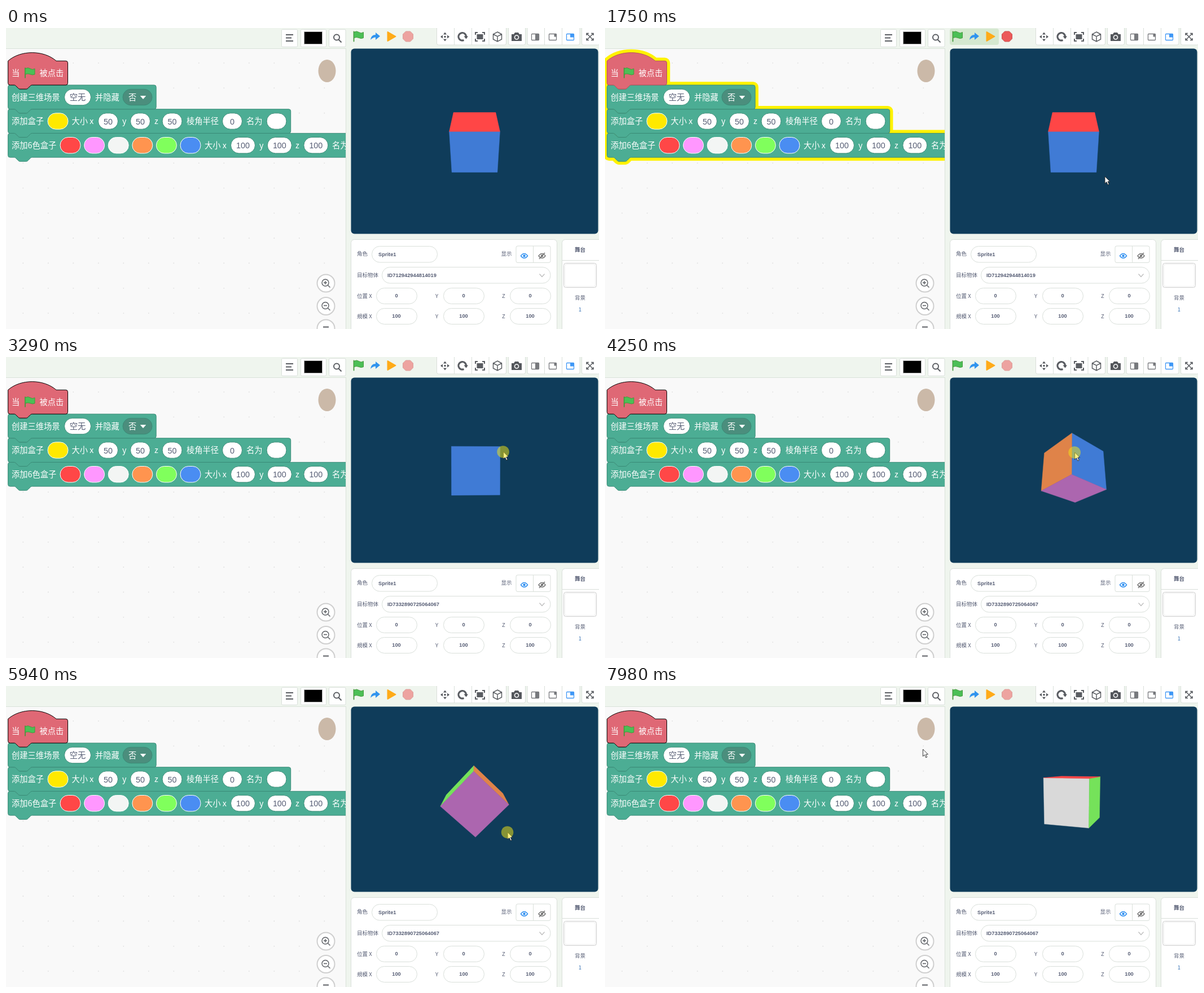
An HTML page that plays this animation: 1051x533 px, repeating every 8000 ms.

```html
<!DOCTYPE html>
<html lang="zh">
<head>
<meta charset="utf-8">
<title>三维盒子</title>
<style>
  html, body { margin: 0; width: 100%; height: 100%; overflow: hidden; background: #eff5ee; }
  svg { display: block; }
  text { font: 14.25px "Liberation Sans", "Noto Sans CJK SC", sans-serif; fill: #575e75; }
  .label { font-family: "Noto Sans CJK SC", sans-serif; fill: #fff; }
  .small { font: 9.5px "Noto Sans CJK SC", sans-serif; }
  .value { font: bold 9.3px "Liberation Sans", sans-serif; }
  .mid { text-anchor: middle; }
  .strong { font-weight: bold; }
  .box { fill: #fff; stroke: #d9dfda; }
  .icon { fill: none; stroke: #5a5d62; stroke-width: 2; }
</style>
</head>
<body>
<svg id="stage" width="1051" height="533" viewBox="0 0 1051 533"></svg>
<script>
const LOOP = 8000;
const TEAL = '#4cad94', TEAL_EDGE = '#3a8b76';

// ---------- helpers for static drawing ----------
const rect = (x, y, w, h, r = 0, attrs = 'class="box"') =>
  `<rect x="${x}" y="${y}" width="${w}" height="${h}" rx="${r}" ${attrs}/>`;
const path = (d, attrs = 'class="icon"') => `<path d="${d}" ${attrs}/>`;
const text = (x, y, str, cls) => `<text x="${x}" y="${y}" class="${cls}">${str}</text>`;
const label = (x, cy, str) => text(x, cy + 5, str, 'label');
const small = (x, y, str) => text(x, y, str, 'small');
const pill = (cx, cy, w, str = '', fill = '#fff', edge = TEAL_EDGE) =>
  rect(cx - w / 2, cy - 14.2, w, 28.4, 14.2, `fill="${fill}" stroke="${edge}"`) +
  text(cx, cy + 5.5, str, 'mid');
const swatch = (cx, cy, color) => pill(cx, cy, 36, '', color, '#fff');
const field = (x, y, w, str) =>
  rect(x + .5, y + .5, w, 28, 14) + text(x + w / 2, y + 17, str, 'value mid');
const flag = (x, y) =>
  `<g transform="translate(${x} ${y})">` +
  path('M1 1V18', 'stroke="#45993d" stroke-width="1.8" stroke-linecap="round"') +
  path('M1 2Q6-1 10 2T18 2V12Q14 14 10 12T1 12Z', 'fill="#4cbf56" stroke="#45993d"') + '</g>';

// ---------- code blocks ----------
const SCALE = .89;
const NOTCH = 'c2 0 3 1 4 2l4 4c1 1 2 2 4 2h12c2 0 3-1 4-2l4-4c1-1 2-2 4-2';
const NOTCH_BACK = 'c-2 0-3 1-4 2l-4 4c-1 1-2 2-4 2h-12c-2 0-3-1-4-2l-4-4c-1-1-2-2-4-2';
const blockPath = (top, w) =>
  `${top}H${w - 4}a4 4 0 0 1 4 4v40a4 4 0 0 1-4 4H48${NOTCH_BACK}H4a4 4 0 0 1-4-4z`;
const blocks = [
  ['hat', 58.3, 119, 'M0 0c25-22 71-22 96 0', '#df6875', '#000'],
  ['', 101, 295], ['', 143.7, 563], ['', 186.4, 760]
].map(([id, y, w, top = `M0 4A4 4 0 0 1 4 0H12${NOTCH}`, fill = TEAL, edge = TEAL_EDGE]) => ({
  id, fill, edge, d: blockPath(top, w), place: `transform="translate(3.6 ${y}) scale(${SCALE})"`
}));
const drawBlocks = () => [...blocks].reverse().map(b =>
  path(b.d, `${b.id && `id="${b.id}"`} ${b.place} fill="${b.fill}" stroke="${b.edge}" stroke-width="1.1"`)).join('');
const drawGlow = () => blocks.map(b =>
  path(b.d, `${b.place} fill="none" stroke="#fff200" stroke-width="13" stroke-linejoin="round"`)).join('');

const blockContents = () => {
  const [a, b, c, d] = [79.5, 122.5, 165, 207.7];
  const colors = ['#ff4747', '#ff97ff', '#f3f5f4', '#ff944f', '#80ff5c', '#4a8df2'];
  return label(10, a, '当') + flag(33, 70) + label(59.5, a, '被点击') +
    label(10, b, '创建三维场景') + pill(127, b, 47, '空无') + label(158, b, '并隐藏') +
    pill(233, b, 52, '', '#4b8e7d') + label(217, b, '否') +
    path('M238.5 120.5h9l-4.5 5z', 'fill="#fff" stroke="#fff" stroke-linejoin="round"') +
    label(10, c, '添加盒子') + swatch(92, c, '#ffe900') + label(116.5, c, '大小 x') +
    pill(181, c, 35, '50') + label(206, c, 'y') + pill(238, c, 35, '50') + label(263, c, 'z') +
    pill(294.5, c, 35, '50') + label(320, c, '棱角半径') + pill(401, c, 35, '0') +
    label(426, c, '名为') + pill(479.5, c, 35) +
    label(10, d, '添加6色盒子') + colors.map((k, i) => swatch(114 + i * 42.6, d, k)).join('') +
    label(352, d, '大小 x') + pill(420, d, 43, '100') + label(449, d, 'y') +
    pill(484.8, d, 43, '100') + label(513, d, 'z') + pill(549.3, d, 43, '100') + label(578, d, '名为');
};

// ---------- interface ----------
const zoomButton = (cy, sign) =>
  `<circle cx="567" cy="${cy}" r="15.5" fill="#fff" stroke="#cfcfcf" stroke-width="2"/>` +
  (sign ? `<circle cx="566" cy="${cy - 1}" r="6" class="icon" style="stroke-width:1.4"/>` +
    path(`M570.5 ${cy + 3.5}l4 4${sign}`, 'class="icon" style="stroke-width:1.4"')
    : path('M562 529.5h10', 'class="icon"'));

const workspace = () => {
  let dots = '';
  for (let x = 29.5; x < 602; x += 44.5)
    for (let y = 62; y < 533; y += 44.3) dots += `M${x} ${y}h1.6`;
  return rect(-5, 36.5, 607.5, 520, 0, 'fill="#f9f9f9" stroke="#d9e2d9"') +
    path(dots, 'stroke="#dedede" stroke-width="1.6"') +
    '<ellipse cx="569" cy="76" rx="15.5" ry="20" fill="#cbb9a8"/>' +
    `<g clip-path="url(#left)"><g id="glow">${drawGlow()}</g>${drawBlocks()}${blockContents()}</g>` +
    zoomButton(452, 'M563 451h6M566 448v6') + zoomButton(492.5, 'M563 491.5h6') + zoomButton(532);
};

const leftToolbar = () =>
  rect(488.5, 2.5, 28, 31, 2) + rect(522.5, 2.5, 45, 31, 2) + rect(572.5, 2.5, 29.5, 31, 2) +
  path('M496 12h13M496 17.5h10M496 23h13', 'class="icon" style="stroke-width:1.8"') +
  rect(528.5, 6.5, 32, 22, 0, 'fill="#000" stroke="#bbb"') +
  '<circle cx="586" cy="16.5" r="5" class="icon"/>' + path('M589.5 20.5l5 5');

const controls = () =>
  `<g id="active">${rect(611, 1, 87, 29, 4, 'fill="#d5e8d0"')}</g>` +
  `<g id="hover">${rect(611, 1, 29, 29, 4, 'fill="#d5e8d0"')}</g>` + flag(615.5, 5.5) +
  path('M646 21q1-9 9-9V8l8 6.5-8 6.5v-4.5q-5 0-9 4.5z', 'fill="#3094ee"') +
  path('M676.5 7v16l14-8z', 'fill="#ffab19" stroke="#ffab19" stroke-width="2" stroke-linejoin="round"') +
  path('M708.5 6h8l5 5v8l-5 5h-8l-5-5v-8z', 'id="stop" fill="#ec5959" stroke="#c9504f"');

const panelIcon = (x, w, h, color) =>
  rect(x - 6.5, 10.5, 13, 11, 1, `fill="none" stroke="${color}" stroke-width="1.3"`) +
  rect(x + 6.5 - w, 10.5, w, h, 0, `fill="${color}"`);

const rightToolbar = () =>
  [[763, 123], [890, 30], [923.5, 93], [1020, 32]].map(([x, w]) => rect(x + .5, -4.5, w, 34.5, 3)).join('') +
  path('M794.5 0v30M825.5 0v30M856 0v30M954.5 0v30M985.5 0v30', 'stroke="#d9dfda"') +
  path('M778 7.5l3 4h-6zM778 23.5l3-4h-6zM770 15.5l4-3v6zM786 15.5l-4-3v6zM776.5 14h3v3h-3z', 'fill="#54575c"') +
  path('M811.5 21.500a6.800 6.800 0 1 1 4-6', 'class="icon" style="stroke-width:3.2"') +
  path('M811.5 14.500h7.500l-3.500 5z', 'fill="#54575c"') +
  path('M832 12V8h4M844 8h4v4M848 19v4h-4M836 23h-4v-4') + rect(834.5, 11, 11, 9, 0, 'fill="#5a5d62"') +
  path('M871 7l7.5 4v9l-7.5 4-7.5-4v-9zM863.5 11l7.5 4 7.5-4M871 15v9', 'class="icon" style="stroke-width:1.5"') +
  path('M896 11h4l2-3h6l2 3h4v12h-18z', 'fill="#54575c"') +
  '<circle cx="905" cy="16.5" r="3.5" fill="none" stroke="#fff" stroke-width="1.6"/>' +
  panelIcon(938, 6.5, 11, '#77797d') + panelIcon(969, 4, 5, '#77797d') + panelIcon(1000, 6.5, 6, '#3f97f6') +
  path('M1029 13V9.5h4M1037 9.5h4V13M1041 18v3.5h-4M1033 21.5h-4V18M1029.5 10l11 11M1040.5 10l-11 11', 'class="icon" style="stroke-width:1.5"');

const eye = (x, color) =>
  path(`M${x - 6} 403.5q6-8 12 0q-6 8-12 0z`, `fill="none" stroke="${color}" stroke-width="1.5"`) +
  `<circle cx="${x}" cy="403.5" r="2.2" fill="${color}"/>`;

const panels = () =>
  rect(611.5, 374.5, 365, 180, 6) + rect(985.5, 374.5, 80, 180, 6) +
  small(622, 403, '角色') + rect(648.5, 386.5, 116, 28.5, 14) + text(660, 403.5, 'Sprite1', 'value') +
  small(877.5, 403, '显示') + rect(904, 386, 61, 29.5, 3) + path('M934.5 386v29', 'stroke="#d9dfda"') +
  eye(918.5, '#2f8ff0') + eye(950, '#777') + path('M945 409l10-11', 'stroke="#777" stroke-width="1.5"') +
  small(622, 440.5, '目标物体') + rect(666.5, 423.5, 298.5, 28.5, 14) +
  '<text x="676" y="441" class="value" id="objectId"></text>' +
  path('M945.5 435.5l4.5 5 4.5-5', 'fill="none" stroke="#bbb" stroke-width="1.2"') +
  [['位置 X', 0, 460], ['規模 X', 100, 496]].map(([name, value, y]) =>
    small(622, y + 17.5, name) + small(761, y + 17.5, 'Y') + small(879, y + 17.5, 'Z') +
    [656, 775, 893].map(x => field(x, y, 72, value)).join('')).join('') +
  text(1017.5, 395.5, '舞台', 'small mid strong') + path('M985 411.5h66', 'stroke="#d9dfda"') +
  rect(988.5, 416.5, 58, 43, 4, 'fill="#fff" stroke="#ccc"') +
  rect(990.5, 418.5, 54, 39, 3, 'fill="none" stroke="#eee"') +
  text(1017.5, 480.5, '背景', 'small mid') +
  '<text x="1017.5" y="501.5" class="small mid" style="fill:#3973b5">1</text>';

const svg = document.getElementById('stage');
svg.innerHTML =
  '<defs><clipPath id="left"><path d="M0 37H602V533H0z"/></clipPath></defs>' +
  rect(0, 0, 1051, 533, 0, 'fill="#eff5ee"') +
  workspace() + leftToolbar() + controls() + rightToolbar() +
  rect(611.5, 36.5, 438, 328, 6, 'fill="#0f3c5a"') + '<g id="cube"></g>' + panels() +
  '<g id="pointer">' + path('M0 0V12.5L3 9.8 5.2 14.8 7.3 13.9 5.2 9H9z', 'fill="#fff" stroke="#222" stroke-width=".9"') +
  '<circle id="press" cx="-.5" cy="0" r="10.8" fill="#f2e416" fill-opacity=".52"/></g>';

// ---------- cube ----------
const ring = [[-1, 1], [1, 1], [1, -1], [-1, -1]];
const side = i => {
  const [a, b] = [ring[i], ring[(i + 1) % 4]];
  return [[a[0], -1, a[1]], [b[0], -1, b[1]], [b[0], 1, b[1]], [a[0], 1, a[1]]];
};
const cap = y => ring.map(([x, z]) => [x, y, z]);
const faces = [
  ['#407bd5', side(0)], ['#d9d9d9', side(1)], ['#75e25a', side(2)], ['#df8349', side(3)],
  ['#ff4646', cap(1)], ['#ac66af', cap(-1).reverse()]
];
const CENTER = [830.5, 200.5], FOCAL = 388, DISTANCE = 10;

function project([x, y, z], azimuth, elevation) {
  const [sa, ca, se, ce] = [Math.sin(azimuth), Math.cos(azimuth), Math.sin(elevation), Math.cos(elevation)];
  const toward = x * sa + z * ca;
  const k = FOCAL / (DISTANCE - y * se - toward * ce);
  return [CENTER[0] + k * (x * ca - z * sa), CENTER[1] - k * (y * ce - toward * se)];
}

function cubeMarkup(azimuth, elevation, size, tint) {
  return faces.map(([color, corners]) => {
    const p = corners.map(c => project(c.map(v => v * size), azimuth, elevation));
    const area = p.reduce((sum, [x, y], i) => {
      const [nx, ny] = p[(i + 1) % 4];
      return sum + x * ny - nx * y;
    }, 0);
    const fill = tint || color;
    return area < 0 ? `<polygon points="${p.join(' ')}" fill="${fill}" stroke="${fill}" stroke-width=".5"/>` : '';
  }).join('');
}

// ---------- motion ----------
// time, azimuth, elevation in degrees
const cameraKeys = [
  [2630, 0, 29.3], [3290, -3, 1.5], [3430, -7, -3], [4250, -42, -30], [5070, -100, -70],
  [5940, -133.5, -75], [6760, -170, -62], [7100, -219.4, -47], [7400, -240, 42], [7660, -251, 8]
];
// time, x, y
const pointerKeys = [
  [190, 855, 399], [940, 624, 21], [1400, 624, 21], [1750, 886, 263], [2080, 880, 205],
  [2630, 880, 205], [2950, 904, 190], [3290, 881.5, 168], [3700, 908, 150], [4250, 832.5, 169],
  [4700, 888, 141], [5070, 889, 150], [5500, 862, 205], [5940, 889, 259], [6300, 911, 250],
  [6760, 907, 243], [7100, 816, 225], [7400, 843, 307], [7650, 846, 262], [7980, 563.5, 112]
];
const presses = [[1000, 1140], [2700, 3440], [3560, 3900], [4190, 5000], [5300, 6650], [7000, 7630]];

function sample(keys, t) {
  const i = keys.findIndex(k => k[0] > t);
  if (i < 0) return keys[keys.length - 1].slice(1);
  if (i === 0) return keys[0].slice(1);
  const [a, b] = [keys[i - 1], keys[i]];
  const u = (t - a[0]) / (b[0] - a[0]);
  return a.slice(1).map((v, j) => v + (b[j + 1] - v) * u);
}

const el = id => document.getElementById(id);
const show = (id, on) => el(id).setAttribute('visibility', on ? 'visible' : 'hidden');

function render(t) {
  const within = (from, to) => t >= from && t < to;
  const running = within(1400, 2320), rebuilding = within(2010, 2290);
  const [azimuth, elevation] = sample(cameraKeys, t).map(d => d * Math.PI / 180);
  el('cube').innerHTML = rebuilding
    ? cubeMarkup(azimuth, elevation, .5, '#e6d200')
    : cubeMarkup(azimuth, elevation, 1);
  el('objectId').textContent = t < 2010 ? 'ID712942944814019' : 'ID7332890725064067';
  show('glow', running);
  show('active', running);
  show('hover', within(900, 1460));
  el('stop').setAttribute('opacity', running ? 1 : .52);
  el('hat').setAttribute('stroke', running ? '#b5505d' : '#000');
  const pointerOn = t >= 190;
  show('pointer', pointerOn);
  show('press', pointerOn && presses.some(p => within(...p)));
  el('pointer').setAttribute('transform', `translate(${sample(pointerKeys, t)})`);
}

const start = performance.now();
function tick() {
  render((performance.now() - start) % LOOP);
  requestAnimationFrame(tick);
}
tick();
</script>
</body>
</html>
```
